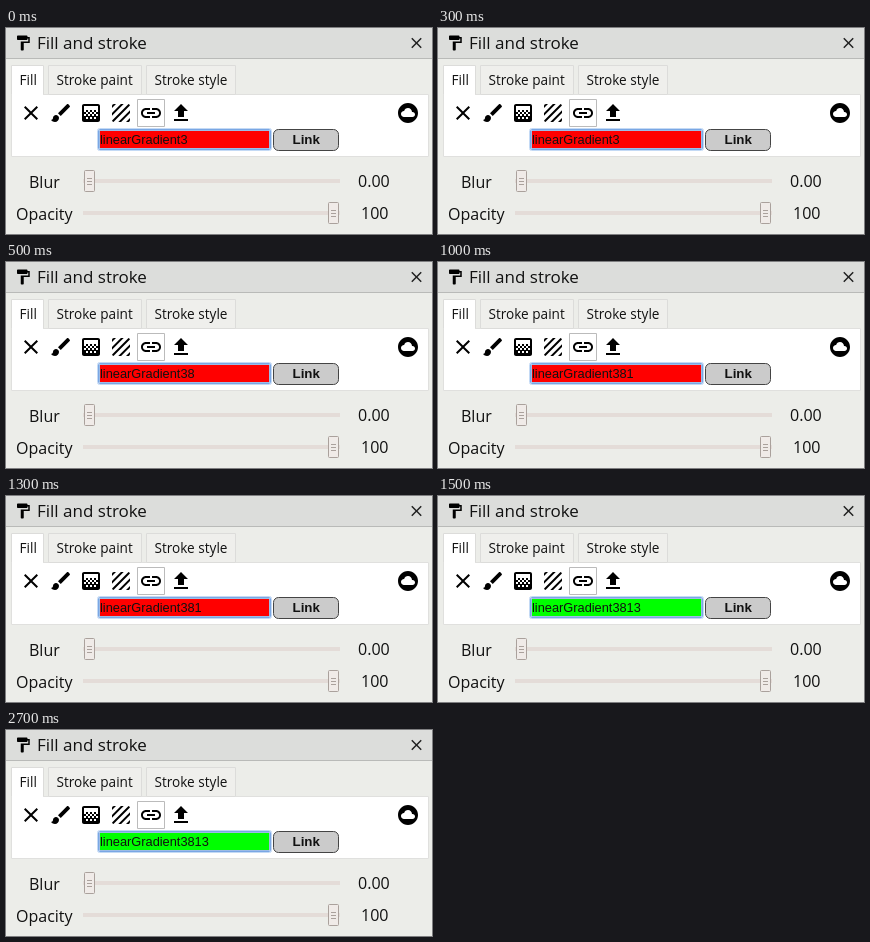
Write an HTML page with a canvas that moves like this. It is 426x206 px and loops after 3.5 s.

```html
<!DOCTYPE html>
<html lang="en">
<head>
<meta charset="utf-8">
<style>
html, body { margin: 0; width: 100%; height: 100%; overflow: hidden; background: #ecede9; }
canvas { display: block; }
</style>
</head>
<body>
<canvas id="stage" width="426" height="206"></canvas>
<script>
const ctx = document.getElementById('stage').getContext('2d');
const LOOP = 3500;
const INK = '#111';
const SANS = '"Open Sans", sans-serif';
const ARIAL = '"Liberation Sans", Arial, sans-serif';

// Icon outlines on a 24 unit grid
const ICONS = {
  roller: 'M18 4V3c0-.55-.45-1-1-1H5c-.55 0-1 .45-1 1v4c0 .55.45 1 1 1h12c.55 0 1-.45 1-1V6h1v4H9v11c0 .55.45 1 1 1h2c.55 0 1-.45 1-1v-9h8V4h-3z',
  close: 'M19 6.41L17.59 5 12 10.59 6.41 5 5 6.41 10.59 12 5 17.59 6.41 19 12 13.41 17.59 19 19 17.59 13.41 12z',
  brush: 'M7 14c-1.66 0-3 1.34-3 3 0 1.31-1.16 2-2 2 .92 1.22 2.49 2 4 2 2.21 0 4-1.79 4-4 0-1.66-1.34-3-3-3zm13.71-9.37l-1.34-1.34c-.39-.39-1.02-.39-1.41 0L9 12.25 11.75 15l8.96-8.96c.39-.39.39-1.02 0-1.41z',
  gradient: 'M11 9h2v2h-2zm-2 2h2v2H9zm4 0h2v2h-2zm2-2h2v2h-2zM7 9h2v2H7zm12-6H5c-1.1 0-2 .9-2 2v14c0 1.1.9 2 2 2h14c1.1 0 2-.9 2-2V5c0-1.1-.9-2-2-2zM9 18H7v-2h2v2zm4 0h-2v-2h2v2zm4 0h-2v-2h2v2zm2-7h-2v2h2v2h-2v-2h-2v2h-2v-2h-2v2H9v-2H7v2H5v-2h2v-2H5V5h14v6z',
  hatch: 'M19.51 3.08L3.08 19.51c.09.34.27.65.51.9.25.24.56.42.9.51L20.93 4.49c-.19-.69-.73-1.23-1.42-1.41zM11.88 3L3 11.88v2.83L14.71 3h-2.83zM5 3c-1.1 0-2 .9-2 2v2l4-4H5zm14 18c.55 0 1.05-.22 1.41-.59.37-.36.59-.86.59-1.41v-2l-4 4h2zm-9.71 0h2.83L21 12.12V9.29L9.29 21z',
  link: 'M3.9 12c0-1.71 1.39-3.1 3.1-3.1h4V7H7c-2.76 0-5 2.24-5 5s2.24 5 5 5h4v-1.9H7c-1.71 0-3.1-1.39-3.1-3.1zM8 13h8v-2H8v2zm9-6h-4v1.9h4c1.71 0 3.1 1.39 3.1 3.1s-1.39 3.1-3.1 3.1h-4V17h4c2.76 0 5-2.24 5-5s-2.24-5-5-5z',
  upload: 'M9 16h6v-6h4l-7-7-7 7h4zm-4 2h14v2H5z',
  cloud: 'M12 2C6.48 2 2 6.48 2 12s4.48 10 10 10 10-4.48 10-10S17.52 2 12 2zm4.5 14H8c-1.66 0-3-1.34-3-3s1.34-3 3-3l.14.01C8.58 8.28 10.13 7 12 7c2.21 0 4 1.79 4 4h.5c1.38 0 2.5 1.12 2.5 2.5S17.88 16 16.5 16z'
};

function rect(x, y, w, h, fill) {
  ctx.fillStyle = fill;
  ctx.fillRect(x, y, w, h);
}

function box(x, y, w, h, fill, line, radius = 0) {
  ctx.beginPath();
  ctx.roundRect(x + .5, y + .5, w - 1, h - 1, radius);
  ctx.fillStyle = fill;
  ctx.fill();
  ctx.lineWidth = 1;
  ctx.strokeStyle = line;
  ctx.stroke();
}

function text(str, x, y, size, family = SANS, weight = '') {
  ctx.font = `${weight} ${size}px ${family}`;
  ctx.fillStyle = INK;
  ctx.fillText(str, x, y);
}

function icon(name, cx, cy, size = 24, fill = '#000') {
  ctx.save();
  ctx.translate(cx - size / 2, cy - size / 2);
  ctx.scale(size / 24, size / 24);
  ctx.fillStyle = fill;
  ctx.fill(new Path2D(ICONS[name]));
  ctx.restore();
}

function tab(label, x, w, fill) {
  box(x, 37, w, 30, fill, '#dcdcda');
  text(label, x + 8.5, 57, 13.6);
}

function slider(y, thumbX, label, labelX, value, valueX) {
  text(label, labelX, y + 7, 16);
  rect(77, y - 2, 257, 4, '#e4dcd8');
  box(thumbX, y - 11, 11, 22, '#f0ebe8', '#aaa19c', 1);
  for (let i = -3; i <= 3; i += 3) rect(thumbX + 3, y + i, 5, 1, '#aaa19c');
  text(value, valueX, y + 6, 16);
}

function panel() {
  rect(0, 0, 426, 206, '#ecede9');
  rect(0, 0, 426, 30, '#dcdddb');
  rect(0, 30, 426, 1, '#b9bab8');
  icon('roller', 17, 15, 18);
  text('Fill and stroke', 31, 21, 17);
  icon('close', 410.5, 15, 18, '#222');

  box(5, 66, 418, 63, '#fff', '#e0e0de');
  tab('Stroke paint', 42, 94, '#efefec');
  tab('Stroke style', 140, 90, '#efefec');
  tab('Fill', 5, 33, '#fff');
  rect(6, 65, 31, 3, '#fff');

  box(131, 71, 28, 28, '#fff', '#bbb');
  ['close', 'brush', 'gradient', 'hatch', 'link', 'upload']
    .forEach((name, i) => icon(name, 25 + 30 * i, 85));
  icon('cloud', 402, 85);

  box(267, 101, 66, 22, '#cbcbcb', '#444', 5);
  text('Link', 286.5, 116, 13.33, ARIAL, 'bold');

  slider(153, 78, 'Blur', 23, '0.00', 352);
  slider(185, 322, 'Opacity', 10, '100', 355);
}

function field(t) {
  const typed = Math.min(4, 1 + Math.floor(t / 500));
  box(91, 100, 175, 23, '#fff', '#c4daf5', 2);
  box(92, 101, 173, 21, '#fff', '#7aa7e4', 1);
  box(93, 102, 171, 19, '#fff', '#9dbce6');
  rect(94, 103, 169, 17, typed === 4 ? '#0f0' : '#f00');
  text('linearGradient' + '3813'.slice(0, typed), 94, 116, 12.8, ARIAL);
}

function frame(now) {
  panel();
  field(now % LOOP);
  requestAnimationFrame(frame);
}
requestAnimationFrame(frame);
</script>
</body>
</html>
```
